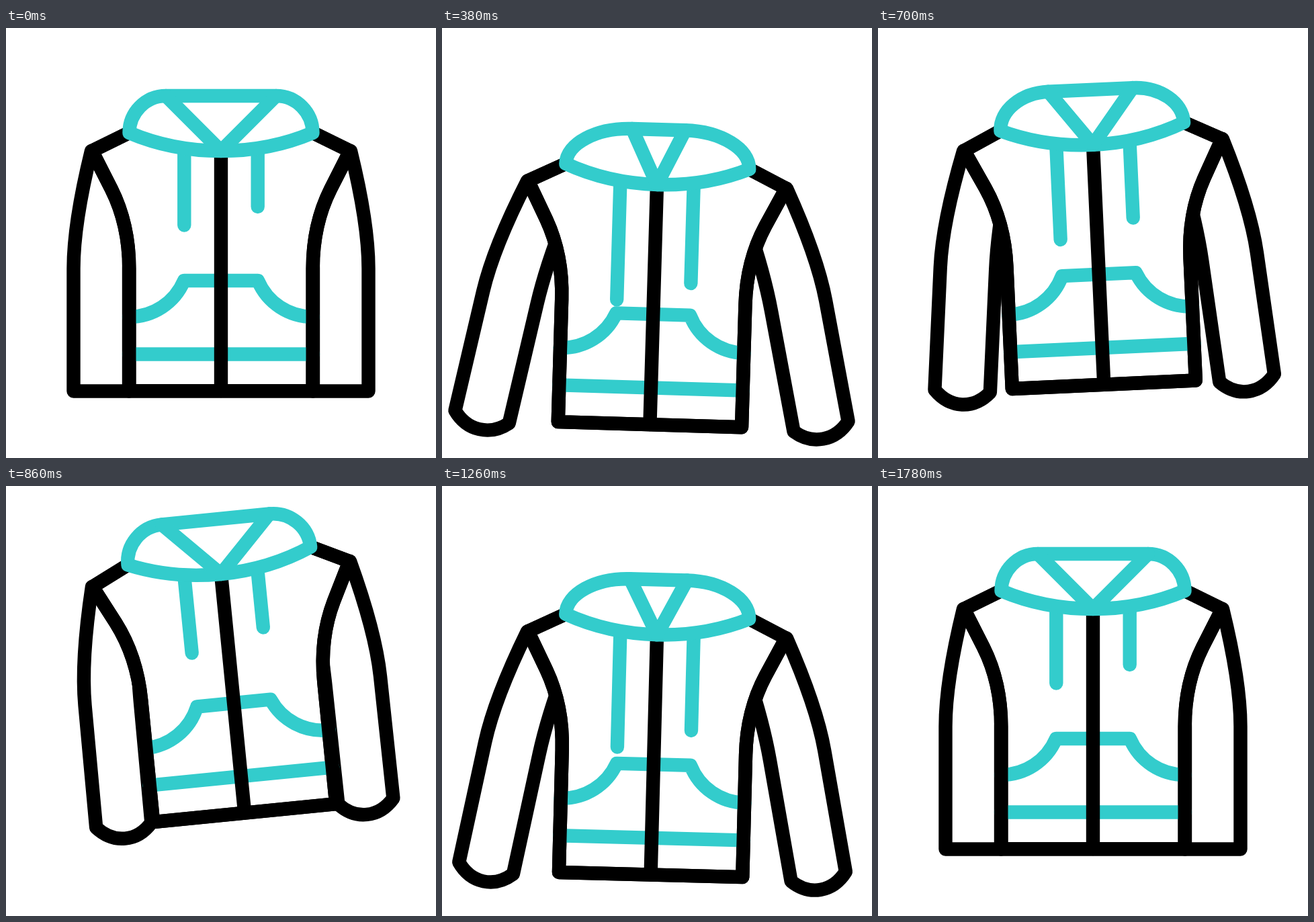
Recreate the animation shown at these times as an HTML page with a canvas. Size 640 px wide and 640 px high, loop 2400 ms.

```html
<!DOCTYPE html>
<html lang="en">
<head>
<meta charset="utf-8">
<title>Hoodie</title>
<style>
html, body { margin: 0; width: 100%; height: 100%; overflow: hidden; background: #fff; }
canvas { display: block; width: 640px; height: 640px; }
</style>
</head>
<body>
<canvas id="stage"></canvas>
<script>
const LOOP = 2400, STEP = 20;
const BLACK = '#000', TEAL = '#33cccc', WHITE = '#fff';
const canvas = document.getElementById('stage');
const ctx = canvas.getContext('2d');
const dpr = window.devicePixelRatio || 1;
canvas.width = canvas.height = 640 * dpr;

// lift: vertical shift, tilt and arms in degrees, top: half width of the hood's top edge
const rest = { lift: 0, tilt: 0, top: 82, cord: 0, armL: 0, armR: 0, cuff: 0 };
const up = { ...rest, lift: -55.7, tilt: -5.92, cuff: 20 };
const down = { lift: 53, tilt: 1.8, top: 37, cord: 66, armL: 12.2, armR: 13, cuff: 20 };
const keys = [
  { t: 0, pose: rest },
  { t: 443, pose: down },
  { t: 912, pose: up },
  { t: 1355, pose: { ...down, lift: 51, tilt: 2.5 } },
  { t: 1785, pose: rest, ease: [0.427, 0.366] }
];

// Cubic ease with flat ends; a and b are the handle times
function ease(x, [a, b] = [1 / 3, 2 / 3]) {
  let lo = 0, hi = 1;
  for (let i = 0; i < 24; i++) {
    const m = (lo + hi) / 2, n = 1 - m;
    if (3 * n * n * m * a + 3 * n * m * m * b + m * m * m < x) lo = m; else hi = m;
  }
  return lo * lo * (3 - 2 * lo);
}

function poseAt(t) {
  const i = keys.findIndex(k => k.t > t);
  if (i < 0 || t <= 0) return rest;
  const from = keys[i - 1], to = keys[i];
  const s = ease((t - from.t) / (to.t - from.t), to.ease);
  const pose = {};
  for (const k in rest) pose[k] = from.pose[k] + (to.pose[k] - from.pose[k]) * s;
  return pose;
}

function rotate(deg, x, y) {
  ctx.translate(x, y);
  ctx.rotate(deg * Math.PI / 180);
  ctx.translate(-x, -y);
}

function draw(d, color, fill) {
  const path = new Path2D(d);
  if (fill) {
    ctx.fillStyle = WHITE;
    ctx.fill(path);
  }
  ctx.strokeStyle = color;
  ctx.stroke(path);
}

function sleeve(angle, cuff, mirrored) {
  ctx.save();
  if (mirrored) {
    ctx.translate(640, 0);
    ctx.scale(-1, 1);
  }
  rotate(angle, 127, 183);
  const y = 540.5 + cuff * 4 / 3;
  draw(`M127 183 C115 232 100.5 298 100.5 358 V540.5
    C124.5 ${y} 159.5 ${y} 183 540.5 V358 C183 325 186 280 194 225`, BLACK);
  ctx.restore();
}

function hood(half) {
  const l = 320 - half, r = 320 + half, h = (l - 183) * 0.55;
  draw(`M183.5 156 C183.5 126 ${l - h} 101 ${l} 101 H${r}
    C${r + h} 101 456.5 126 456.5 156 C414 174 368 183 320 183 C272 183 226 174 183.5 156 Z`, TEAL, true);
  draw(`M${l} 101 L320 183 L${r} 101`, TEAL);
}

function render(t) {
  const p = poseAt(t);
  ctx.setTransform(dpr, 0, 0, dpr, 0, 0);
  ctx.fillStyle = WHITE;
  ctx.fillRect(0, 0, 640, 640);
  ctx.lineWidth = 20.4;
  ctx.lineCap = ctx.lineJoin = 'round';

  ctx.translate(0, p.lift);
  rotate(p.tilt, 320, 183);
  sleeve(p.armL, p.cuff, false);
  sleeve(p.armR, p.cuff, true);

  const body = `M183 156 L128 183 L157 240 C174 274 183.3 316 183.3 358 V540.3
    H456.7 V358 C456.7 316 466 274 483 240 L512 183 L457 156`;
  draw(body, BLACK, true);
  draw('M183 430 C219 430 251 409 265 376 H375 C389 409 421 430 457 430 M183 485.5 H457', TEAL);
  draw(`M265.3 183 V${293.5 + p.cord} M374.7 183 V${266 + p.cord}`, TEAL);
  draw('M320 183 V540', BLACK);
  draw(body, BLACK);
  hood(p.top);
}

function tick() {
  const t = performance.now() % LOOP;
  render(Math.floor(t / STEP) * STEP);
  requestAnimationFrame(tick);
}
tick();
</script>
</body>
</html>
```
